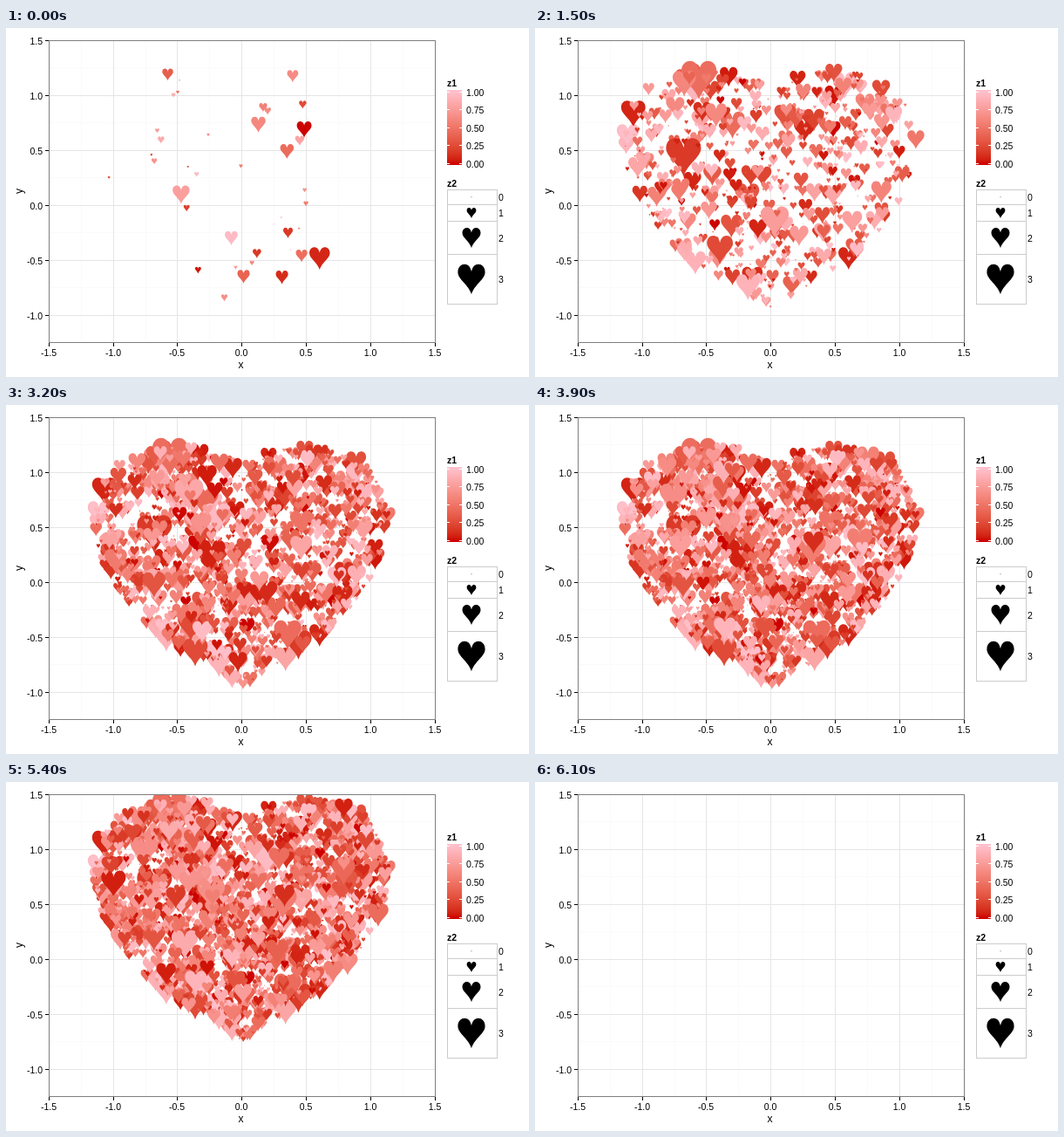
An HTML page with a canvas for the animation above (7500 ms loop, 600 by 400 pixels).

```html
<!DOCTYPE html>
<html lang="en">
<head>
<meta charset="utf-8">
<title>Heart scatter plot</title>
<style>
html, body { margin: 0; width: 100%; height: 100%; overflow: hidden; background: #fff; }
canvas { display: block; }
</style>
</head>
<body>
<canvas id="stage" width="600" height="400"></canvas>
<script>
const ctx = document.getElementById('stage').getContext('2d');
const STEP = 100, LOOP = 7500, GROW = 50, FLY = 12, PER_STEP = 40;
const UNIT_X = 443 / 3, UNIT_Y = 126;
const PANEL = { x: 49, y: 14, w: 443, h: 346 };
const FONT = '"Liberation Sans", Arial, sans-serif';

const toX = v => 270.3 + v * UNIT_X;
const toY = v => 202.9 - v * UNIT_Y;
const snap = v => Math.round(v) + 0.5;
const widthOf = z2 => 0.6 + 10.2 * z2;

// Red to pink, blended evenly in CIE Lab
function colorOf(z1) {
  const mix = (a, b) => a + (b - a) * z1;
  const l = mix(42.7, 83.6), a = mix(68, 24.1), b = mix(57, 3.3);
  const fy = (l + 16) / 116;
  const linear = f => f > 6 / 29 ? f ** 3 : (f - 4 / 29) * 108 / 841;
  const x = 0.9505 * linear(fy + a / 500), y = linear(fy), z = 1.089 * linear(fy - b / 200);
  const channel = v =>
    Math.round(255 * (v > 0.0031 ? 1.055 * v ** (1 / 2.4) - 0.055 : Math.max(0, 12.92 * v)));
  return `rgb(${[
    channel(3.2406 * x - 1.5372 * y - 0.4986 * z),
    channel(-0.9689 * x + 1.8758 * y + 0.0415 * z),
    channel(0.0557 * x - 0.204 * y + 1.057 * z)
  ]})`;
}

let seed = 20140214;
function random() {
  seed = (seed + 0x6D2B79F5) | 0;
  let t = Math.imul(seed ^ (seed >>> 15), 1 | seed);
  t = (t + Math.imul(t ^ (t >>> 7), 61 | t)) ^ t;
  return ((t ^ (t >>> 14)) >>> 0) / 4294967296;
}
const normal = () =>
  Math.sqrt(-2 * Math.log(1 - random())) * Math.cos(2 * Math.PI * random());

// Random point inside (x² + y² - 1)³ < x²y³
function randomPoint() {
  for (;;) {
    const x = random() * 2.4 - 1.2, y = random() * 2.4 - 1.1;
    if ((x * x + y * y - 1) ** 3 < x * x * y ** 3) return { x: toX(x), y: toY(y) };
  }
}

const hearts = Array.from({ length: GROW * PER_STEP }, () => ({
  ...randomPoint(),
  width: widthOf(Math.abs(normal())),
  color: colorOf(random())
}));

const heartPath = new Path2D(
  'M0 .55C-.1 .2-.5 0-.5-.26C-.5-.44-.39-.55-.25-.55C-.1-.55-.03-.42 0-.28' +
  'C.03-.42 .1-.55 .25-.55C.39-.55 .5-.44 .5-.26C.5 0 .1 .2 0 .55Z');

function heart(x, y, width, color) {
  ctx.save();
  ctx.translate(x, y);
  ctx.scale(width, width);
  ctx.fillStyle = color;
  ctx.fill(heartPath);
  ctx.restore();
}

function line(x1, y1, x2, y2, color) {
  ctx.strokeStyle = color;
  ctx.beginPath();
  ctx.moveTo(x1, y1);
  ctx.lineTo(x2, y2);
  ctx.stroke();
}

function text(str, x, y, align = 'left', font = '10.5px') {
  ctx.font = `${font} ${FONT}`;
  ctx.textAlign = align;
  ctx.fillStyle = '#000';
  ctx.fillText(str, x, y);
}

function grid(offset, color) {
  const { x, y, w, h } = PANEL;
  for (let v = -1.5 + offset; v < 1.5; v += 0.5) {
    const gx = snap(toX(v)), gy = snap(toY(v));
    line(gx, y, gx, y + h, color);
    if (v > -1.25) line(x, gy, x + w, gy, color);
  }
}

function axes() {
  for (let v = -1.5; v <= 1.5; v += 0.5) {
    const x = snap(toX(v)), y = snap(toY(v)), label = v.toFixed(1);
    line(x, 361, x, 365, '#000');
    text(label, x - 0.5, 376, 'center');
    if (v < -1) continue;
    line(45, y, 49, y, '#000');
    text(label, 42, y + 4, 'right');
  }
  text('x', 269.5, 390, 'center', '12px');
  ctx.save();
  ctx.translate(19, 187);
  ctx.rotate(-Math.PI / 2);
  text('y', 0, 0, 'center', '12px');
  ctx.restore();
}

function colorLegend() {
  text('z1', 506, 67, 'left', 'bold 10.5px');
  const ramp = ctx.createLinearGradient(0, 156, 0, 73);
  for (let i = 0; i <= 16; i++) ramp.addColorStop(i / 16, colorOf(i / 16));
  ctx.fillStyle = ramp;
  ctx.fillRect(506, 71, 17, 86);
  for (let i = 0; i <= 4; i++) {
    const y = snap(154.9 - i * 20.5);
    line(506, y, 509, y, '#fff');
    line(520, y, 523, y, '#fff');
    text((i / 4).toFixed(2), 528, y + 4);
  }
}

function sizeLegend() {
  text('z2', 506, 182, 'left', 'bold 10.5px');
  let top = 185;
  [17, 19, 38, 57].forEach((height, i) => {
    const middle = top + height / 2 + 0.5;
    ctx.strokeStyle = '#ccc';
    ctx.strokeRect(506.5, top + 0.5, 57, height);
    heart(534, middle, Math.max(1, widthOf(i)), '#000');
    text(String(i), 565, middle + 4);
    top += height;
  });
}

function draw(step) {
  ctx.fillStyle = '#fff';
  ctx.fillRect(0, 0, 600, 400);
  ctx.lineWidth = 1;
  grid(0.25, '#fafafa');
  grid(0, '#e5e5e5');

  const lift = 3 * UNIT_Y * (Math.max(0, step - GROW + 1) / FLY) ** 3;
  ctx.save();
  ctx.beginPath();
  ctx.rect(PANEL.x, PANEL.y, PANEL.w, PANEL.h);
  ctx.clip();
  for (const { x, y, width, color } of hearts.slice(0, (step + 1) * PER_STEP)) {
    heart(x, y - lift, width, color);
  }
  ctx.restore();

  ctx.strokeStyle = '#7f7f7f';
  ctx.strokeRect(PANEL.x + 0.5, PANEL.y + 0.5, PANEL.w, PANEL.h);
  axes();
  colorLegend();
  sizeLegend();
}

let shown = -1;
function tick() {
  const step = Math.min(GROW + FLY - 1, Math.floor((performance.now() % LOOP) / STEP));
  if (step !== shown) draw(shown = step);
  requestAnimationFrame(tick);
}
tick();
</script>
</body>
</html>
```
